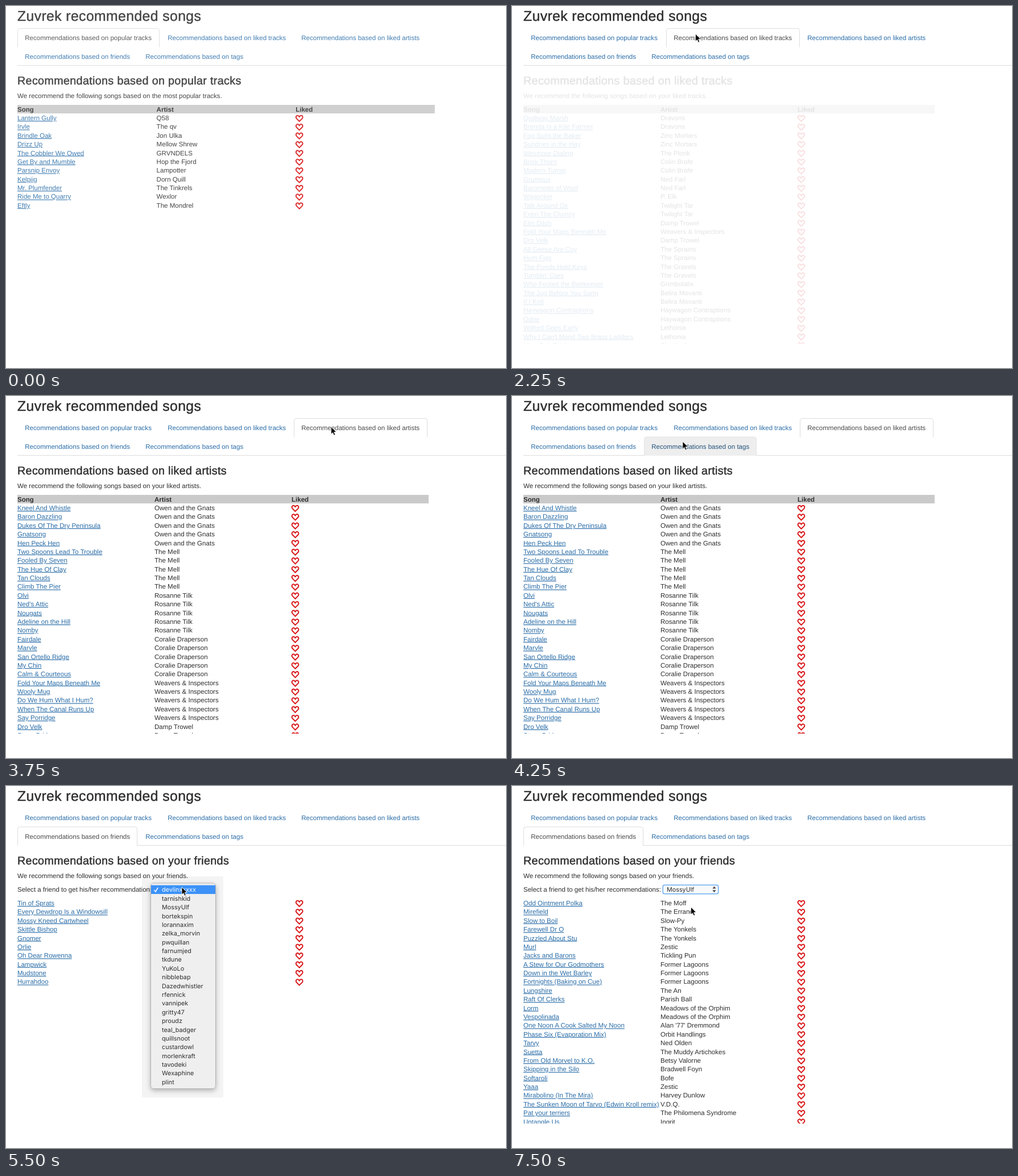
These frames come from a looping animation (879x637 px, 8 s). An HTML page:

```html
<!DOCTYPE html>
<html lang="en">
<head>
<meta charset="utf-8">
<title>Recommended songs</title>
<style>
  html, body { margin: 0; width: 100%; height: 100%; overflow: hidden; background: #fff; }
  svg { display: block; }
  text { font: 11.55px "Liberation Sans", Arial, sans-serif; fill: #2e2e2e; text-rendering: geometricPrecision; white-space: pre; }
  .h1, .h2 { stroke: #2e2e2e; stroke-width: .45px; }
  .h1 { font-size: 24.75px; letter-spacing: .4px; }
  .h2 { font-size: 19.8px; letter-spacing: .31px; }
  .th { font-weight: bold; }
  .link { fill: #2a6da8; text-decoration: underline; }
  .heart { fill: none; stroke: #d81416; stroke-width: 1.9; }
  .tab path { fill: none; stroke: none; }
  .tab text { fill: #2a6da8; }
  .tab.active path { fill: #fff; stroke: #ddd; }
  .tab.active text { fill: #4a4a4a; }
  .tab.hover path { fill: #eee; stroke: #e4e4e4; }
  .tab.hover text { fill: #23527c; }
  .ui { font: 10.8px Inter, Roboto, sans-serif; }
  .ui.on { fill: #fff; }
</style>
</head>
<body>
<svg id="stage" width="879" height="637" viewBox="0 0 879 637">
  <defs>
    <clipPath id="pane"><rect width="879" height="594"/></clipPath>
    <filter id="shadow" x="-20%" y="-10%" width="140%" height="120%">
      <feDropShadow dx="0" dy="3" stdDeviation="4" flood-opacity=".28"/>
    </filter>
  </defs>
</svg>
<script>
const LOOP = 8000, STEP = 250, ROW = 15.385;
const stage = document.getElementById('stage');

function el(parent, tag, attrs = {}, content) {
  const node = document.createElementNS('http://www.w3.org/2000/svg', tag);
  for (const key in attrs) node.setAttribute(key, attrs[key]);
  if (content) node.textContent = content;
  return parent.appendChild(node);
}
const label = (parent, x, y, content, cls = '') => el(parent, 'text', { x, y, class: cls }, content);
const show = (node, on) => { node.style.display = on ? '' : 'none'; };

// Each line reads "Artist = song; song"
const lists = {
  popular: `Q58 = Lantern Gully
The qv = Irvle
Jon Ulka = Brindle Oak
Mellow Shrew = Drizz Up
GRVNDELS = The Cobbler We Owed
Hop the Fjord = Get By and Mumble
Lampotter = Parsnip Envoy
Dorn Quill = Kelpjig
The Tinkrels = Mr. Plumfender
Wexlor = Ride Me to Quarry
The Mondrel = Eftly`,
  tracks: `Dravons = Quillway Marsh; Brenda Is a Kite Farmer
Zinc Mortars = Fog Suits the Baker; Sundries in the Hay
The Plonk = Wexmoor Dialing
Colin Brafe = Brisk Thorn; Modern Turnip
Ned Farl = Grumpus; Barometer of Wool
P. Elk = Wagonkin
Twilight Tar = Talk Around Ox; Even The Clumsy
Damp Trowel = Elm Ditch
Weavers & Inspectors = Fold Your Maps Beneath Me
Damp Trowel = Dro Velk
The Sprains = All Geese Are Coy; Hum Figs
The Gravels = The Ponds Hold Keys; Tumblin' Oars
Grimbolatix = Who Fooled the Beekeeper
Belira Movanti = The Jug Before You Sang; If I Knit
Haywagon Contraptions = Haywagon Contraptions; Odrie
Lethonia = Wilfred Goes Early; Why I Can't Mend Two Brass Ladders
Slumbrel = Nine Oak Fiddles`,
  artists: `Owen and the Gnats = Kneel And Whistle; Baron Dazzling; Dukes Of The Dry Peninsula; Gnatsong; Hen Peck Hen
The Mell = Two Spoons Lead To Trouble; Fooled By Seven; The Hue Of Clay; Tan Clouds; Climb The Pier
Rosanne Tilk = Olvi; Ned's Attic; Nougats; Adeline on the Hill; Nomby
Coralie Draperson = Fairdale; Marvle; San Ortello Ridge; My Chin; Calm & Courteous
Weavers & Inspectors = Fold Your Maps Beneath Me; Wooly Mug; Do We Hum What I Hum?; When The Canal Runs Up; Say Porridge
Damp Trowel = Dro Velk; Straw Bridges`,
  first: `Marietta Polk = Tin of Sprats
Mildjest = Every Dewdrop Is a Windowsill
Hugh Ashenmoor = Mossy Kneed Cartwheel
The Hoy = Skittle Bishop
The Tinkrels = Gnomer
Fabien Oats = Orlie
Crisp Blue J's = Oh Dear Rowenna
Dory Plumb = Lampwick
Norvis = Mudstone
Greg Thackley = Hurrahdoo`,
  second: `The Moff = Odd Ointment Polka
The Errand = Mirefield
Slow-Py = Slow to Boil
The Yonkels = Farewell Dr O; Puzzled About Stu
Zestic = Murl
Tickling Pun = Jacks and Barons
Former Lagoons = A Stew for Our Godmothers; Down in the Wet Barley; Fortnights (Baking on Cue)
The An = Lungshire
Parish Ball = Raft Of Clerks
Meadows of the Orphim = Lorm; Vespolinada
Alan '77' Dremmond = One Noon A Cook Salted My Noon
Orbit Handlings = Phase Six (Evaporation Mix)
Ned Olden = Tarvy
The Muddy Artichokes = Suetta
Betsy Valorne = From Old Morvel to K.O.
Bradwell Foyn = Skipping in the Silo
Bofe = Softaroli
Zestic = Yaaa
Harvey Dunlow = Mirabolino (In The Mira)
V.D.Q. = The Sunken Moon of Tarvo (Edwin Kroll remix)
The Philomena Syndrome = Pat your terriers
Ingrit = Untangle Us`
};
const friends = ('devlinxxxxx tarnishkid MossyUlf bortekspin lorannaxim zelka_morvin pwquillan farnumjed ' +
  'tkdune YuKoLo nibblebap Dazedwhistler rfennick vannipek gritty47 proudz teal_badger quillsnoot ' +
  'custardowl morlenkraft tavodeki Wexaphine plint').split(' ');

// Title and tabs
const page = el(stage, 'g');
label(page, 20, 26.2, 'Zuvrek recommended songs', 'h1');
el(page, 'path', { d: 'M20 104.5H879', stroke: '#ddd' });
const tabs = [
  [20.5, 39.5, 249, 'popular tracks'], [271.5, 39.5, 234, 'liked tracks'], [506.5, 39.5, 234, 'liked artists'],
  [20.5, 72, 210, 'friends'], [232.5, 72, 197, 'tags']
].map(([x, y, w, name]) => {
  const tab = el(page, 'g');
  el(tab, 'path', { d: `M${x} ${y + 33}v-29q0-4 4-4h${w - 8}q4 0 4 4v29` });
  label(tab, x + 12.7, y + 20.5, 'Recommendations based on ' + name);
  return tab;
});

// Content panes
const pane = el(page, 'g', { 'clip-path': 'url(#pane)' });

function heading(parent, name, basis) {
  label(parent, 20, 138.4, 'Recommendations based on ' + name, 'h2');
  label(parent, 20, 162, `We recommend the following songs based on ${basis}.`);
}

function rows(parent, list, top, col) {
  let y = top;
  for (const line of list.split('\n')) {
    const [artist, songs] = line.split(' = ');
    for (const song of songs.split('; ')) {
      label(parent, 20, y, song, 'link');
      label(parent, 20 + col, y, artist);
      el(parent, 'path', {
        class: 'heart', transform: `translate(${26.5 + 2 * col} ${y - 3.2})`,
        d: 'M0 5.2L-4.9.3C-7.4-2.6-4.4-6.6-1.6-4.6L0-2.8 1.6-4.6C4.4-6.6 7.4-2.6 4.9.3Z'
      });
      y += ROW;
    }
  }
}

function table(key, name, basis, col) {
  const view = el(pane, 'g');
  heading(view, name, basis);
  el(view, 'rect', { x: 20, y: 174, width: 3 * col, height: 15, fill: '#cacaca' });
  ['Song', 'Artist', 'Liked'].forEach((head, i) => label(view, 20 + i * col, 185.6, head, 'th'));
  rows(view, lists[key], 201, col);
  return view;
}

const views = {
  popular: table('popular', 'popular tracks', 'the most popular tracks', 244.6),
  tracks: table('tracks', 'liked tracks', 'your liked tracks', 241),
  artists: table('artists', 'liked artists', 'your liked artists', 241),
  friends: el(pane, 'g')
};
heading(views.friends, 'your friends', 'your friends');
label(views.friends, 20, 185.6, 'Select a friend to get his/her recommendations:');
const results = { first: el(views.friends, 'g'), second: el(views.friends, 'g') };
rows(results.first, lists.first, 210, 244.6);
rows(results.second, lists.second, 210, 241);

// Closed select
const ring = el(views.friends, 'rect', { x: 264.5, y: 173.5, width: 99, height: 17, rx: 3.5, fill: '#6aaef2' });
const box = el(views.friends, 'rect', { x: 265.5, y: 174.5, width: 97, height: 15, rx: 3, fill: '#f9f9f9', stroke: '#b4b4b4' });
const chosen = label(views.friends, 272, 185.5, ' ', 'ui');
el(views.friends, 'path', { d: 'M352.5 180.6l3-4 3 4zM352.5 183.2l3 4 3-4z', fill: '#444' });

// Open menu
const menu = el(page, 'g');
el(menu, 'rect', { x: 239, y: 159, width: 143, height: 389, fill: '#000', opacity: .045 });
el(menu, 'rect', { x: 254.5, y: 171, width: 114, height: 361.5, rx: 5, fill: '#efefef', stroke: '#b5b5b5', filter: 'url(#shadow)' });
const bar = el(menu, 'rect', { x: 255, width: 113, height: 15.4, fill: '#3c92f8' });
const items = friends.map((name, i) => label(menu, 274, 186.4 + i * ROW, name, 'ui'));
const check = el(menu, 'path', { d: 'M260.5 183l2.4 3 4.2-7', fill: 'none', 'stroke-width': 1.5 });

const cursor = el(page, 'path', {
  d: 'M0 0V13.2L3 10.4 5 15.2 7.3 14.2 5.3 9.5H9.4Z', fill: '#000', stroke: '#fff', 'stroke-width': .9
});

// Every step overrides part of the state before it
const steps = [
  [0, { tab: 0, hover: -1, view: 'popular', fade: 1, all: .89, at: null, item: -1, friend: 0, list: 'first', focus: false }],
  [250, { all: 1 }],
  [1000, { hover: 1, at: [305, 70] }],
  [1250, { at: [313, 60] }],
  [1500, { at: [319, 53] }],
  [1750, { at: [322.5, 49] }],
  [2250, { tab: 1, hover: -1, view: 'tracks', fade: .13 }],
  [2500, { fade: 1 }],
  [2750, { at: [460, 53] }],
  [3000, { hover: 2, at: [571.5, 54] }],
  [3250, { tab: 2, hover: -1, fade: .6 }],
  [3500, { view: 'artists' }],
  [3750, { fade: 1 }],
  [4000, { at: [520, 62] }],
  [4250, { hover: 4, at: [300, 80] }],
  [4500, { tab: 3, hover: -1, fade: .6, at: [197.5, 86] }],
  [4750, { view: 'friends', fade: .68 }],
  [5000, { fade: 1, at: [212, 100] }],
  [5250, { at: [295, 166] }],
  [5500, { item: 0, at: [309, 178] }],
  [5750, { at: [309, 183] }],
  [6000, { item: 1, at: [310, 197] }],
  [6250, { item: 2, at: [311, 209] }],
  [6500, { item: -1, friend: 2, focus: true }],
  [6750, { at: [313, 211] }],
  [7000, { list: '' }],
  [7250, { list: 'second' }],
  [7500, { at: [314.5, 213] }]
];

function draw(time) {
  const s = Object.assign({}, ...steps.filter(([start]) => start <= time).map(step => step[1]));
  page.style.opacity = s.all;
  tabs.forEach((tab, i) => tab.setAttribute('class', 'tab' + (i === s.tab ? ' active' : i === s.hover ? ' hover' : '')));
  for (const key in views) show(views[key], key === s.view);
  for (const key in results) show(results[key], key === s.list);
  pane.style.opacity = s.fade;
  show(ring, s.focus);
  box.setAttribute('stroke', s.focus ? '#6aaef2' : '#b4b4b4');
  chosen.textContent = friends[s.friend];
  show(menu, s.item >= 0);
  bar.setAttribute('y', 174.6 + s.item * ROW);
  items.forEach((item, i) => item.setAttribute('class', i === s.item ? 'ui on' : 'ui'));
  check.setAttribute('stroke', s.item ? '#2e2e2e' : '#fff');
  show(cursor, s.at);
  if (s.at) cursor.setAttribute('transform', `translate(${s.at})`);
}

const begin = performance.now();
let last = -1;
function run() {
  const step = Math.floor(((performance.now() - begin) % LOOP) / STEP);
  if (step !== last) draw((last = step) * STEP);
  requestAnimationFrame(run);
}
run();
</script>
</body>
</html>
```
